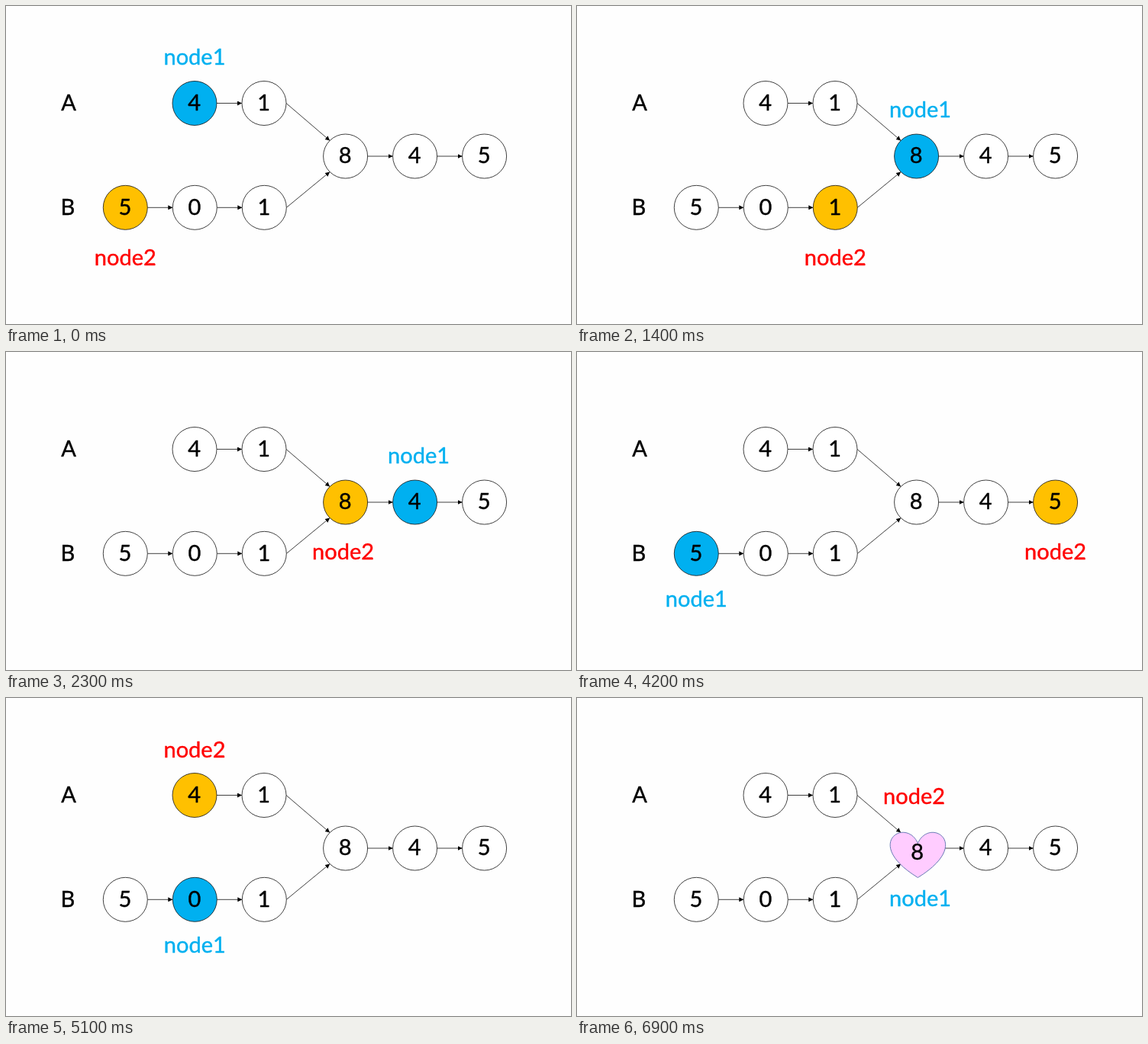
An HTML page that plays this animation: 740x417 px, repeating every 7800 ms.

```html
<!DOCTYPE html>
<html lang="en">
<meta charset="utf-8">
<title>Linked list intersection</title>
<style>
  html, body { margin: 0; width: 100%; height: 100%; overflow: hidden; background: #fefefe; }
  svg { display: block; width: 100%; height: 100%; }
  text {
    font: 29px Lato, "Open Sans", sans-serif;
    text-anchor: middle;
    stroke: currentColor; fill: currentColor;
    stroke-width: .4; stroke-linejoin: round;
  }
  circle, .edge { stroke: #111; stroke-width: .8; }
  .edge { fill: none; marker-end: url(#tip); }
  .heart { fill: #fcf; stroke: #5b6fae; stroke-width: .9; }
</style>
<svg viewBox="0 0 740 417">
  <marker id="tip" markerUnits="userSpaceOnUse" markerWidth="6" markerHeight="6" refX="6" refY="3" orient="auto">
    <path d="M0 0 6 3 0 6z"/>
  </marker>
</svg>
<script>
const svg = document.querySelector("svg");
const RADIUS = 29, SPACING = 91, TICK = 900, LOOP = 7800;

function set(el, attrs) {
  for (const key in attrs) el.setAttribute(key, attrs[key]);
  return el;
}

function add(tag, attrs, content = "") {
  const el = document.createElementNS("http://www.w3.org/2000/svg", tag);
  el.textContent = content;
  return svg.appendChild(set(el, attrs));
}

const row = (x, y, values) =>
  [...values].map((value, i) => ({ x: x + i * SPACING, y, value }));

const headA = row(247, 127.5, "41");
const headB = row(156.3, 264.3, "501");
const tail = row(444.6, 197, "845");
const join = tail[0];
const listA = [...headA, ...tail];
const listB = [...headB, ...tail];

// Arrows leave on the right and arrive on the left, 45° round when sloping
function connect(from, to) {
  const angle = Math.sign(from.y - to.y) * Math.PI / 4;
  const endX = to.x - RADIUS * Math.cos(angle);
  const endY = to.y + RADIUS * Math.sin(angle);
  add("path", { class: "edge", d: `M${from.x + RADIUS} ${from.y}L${endX} ${endY}` });
}

for (const chain of [[...headA, join], [...headB, join], tail])
  chain.slice(1).forEach((node, i) => connect(chain[i], node));

const heart = add("path", {
  class: "heart",
  d: "M0 -6.5C15 -41.5 73.5 -6.5 0 38.5C-73.5 -6.5 -15 -41.5 0 -6.5z",
  transform: `translate(${join.x + 1.8} ${join.y})`
});

const nodes = [...headA, ...headB, ...tail];
for (const node of nodes) {
  node.circle = add("circle", { cx: node.x, cy: node.y, r: RADIUS });
  node.digit = add("text", { x: node.x - .4, y: node.y + 9.3 }, node.value);
}
add("text", { x: 82, y: 137 }, "A");
add("text", { x: 80.8, y: 274 }, "B");

// Each pointer walks one list, then the other, with its label on that list's outer side
const pointer = (name, fill, color, first, second, side, gaps, nudge) => ({
  fill, first, side, gaps, nudge,
  route: [...first, ...second],
  label: add("text", { style: `color:${color}` }, name)
});

const pointers = [
  pointer("node1", "#00b0f0", "#00b0f0", listA, listB, -1, [60, 60], 5),
  pointer("node2", "#ffc000", "#f00", listB, listA, 1, [66, 59], -3)
];

function placeLabel({ label, first, side, gaps, nudge }, node, step, met) {
  const pass = step < first.length ? 0 : 1;
  const gap = met ? 67 : gaps[pass];
  const inner = node === join || node === tail[1];
  set(label, {
    x: node.x + (inner ? nudge : 0),
    y: node.y + (pass ? -side : side) * gap + 9.3
  });
}

function draw(now) {
  const t = now % LOOP;
  // The first step is 400 ms short, the fourth holds 100 ms longer
  const step = Math.floor((t + (t < 3200 ? 400 : 300)) / TICK);
  const current = pointers.map(p => p.route[step]);
  const met = current[0] === current[1];

  for (const node of nodes) {
    const visitor = pointers[current.indexOf(node)];
    set(node.circle, { fill: visitor ? visitor.fill : "#fff" });
  }
  pointers.forEach((p, i) => placeLabel(p, current[i], step, met));

  set(join.circle, { visibility: met ? "hidden" : "visible" });
  set(heart, { visibility: met ? "visible" : "hidden" });
  set(join.digit, { transform: met ? "translate(1.5 5.8)" : "" });
  requestAnimationFrame(draw);
}
draw(performance.now());
</script>
</html>
```
